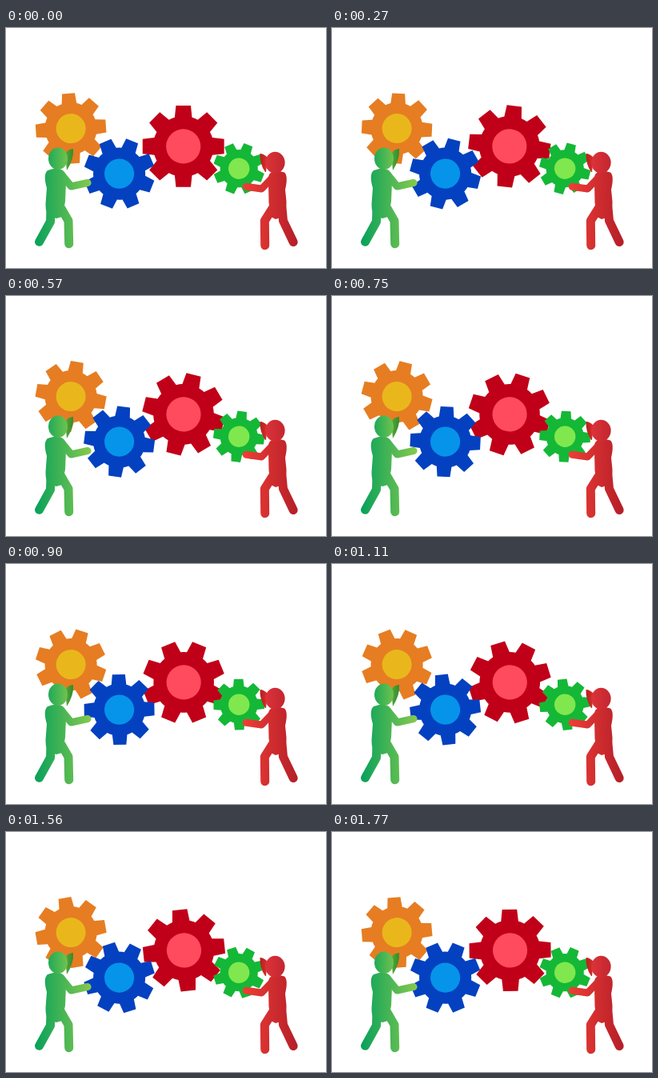
Write an HTML page with a canvas that moves like this. It is 400 by 300 pixels and loops after 1.8 s.

```html
<!DOCTYPE html>
<html lang="en">
<head>
<meta charset="utf-8">
<title>Gears</title>
<style>
html, body { margin: 0; width: 100%; height: 100%; overflow: hidden; background: #fff; }
canvas { display: block; width: 400px; height: 300px; }
</style>
</head>
<body>
<canvas id="stage" width="400" height="300"></canvas>
<script>
const ctx = document.getElementById('stage').getContext('2d');
const LOOP = 1800, STEP = 30, TEETH = 8;
const PITCH = Math.PI * 2 / TEETH;

// start: tooth angle in degrees from straight up; dir: 1 is clockwise
const gears = [
  { x: 81.1, y: 125.6, r: 44.6, hub: 18.5, start: -4, dir: 1, rim: '#e67d22', core: '#e9b71c' },
  { x: 221.7, y: 147.9, r: 51.8, hub: 21.6, start: 0, dir: 1, rim: '#c00018', core: '#ff4b5d', drift: 0.9 },
  { x: 141.6, y: 182.1, r: 44.6, hub: 18.6, start: 21.5, dir: -1, rim: '#0341c0', core: '#0594e9' },
  { x: 291.2, y: 175.7, r: 32.3, hub: 13.2, start: 21.5, dir: -1, rim: '#14b836', core: '#80e84e' }
];

function disc(x, y, rx, ry, fill) {
  ctx.fillStyle = fill;
  ctx.beginPath();
  ctx.ellipse(x, y, rx, ry, 0, 0, Math.PI * 2);
  ctx.fill();
}

function drawGear(g, p) {
  const tip = 0.18, root = 0.29, body = g.r * 0.73;
  ctx.save();
  ctx.translate(g.x + (g.drift || 0) * p, g.y);
  ctx.rotate(g.start * Math.PI / 180 + g.dir * p * PITCH - Math.PI / 2);
  ctx.fillStyle = g.rim;
  ctx.beginPath();
  for (let i = 0; i < TEETH; i++) {
    const a = i * PITCH;
    for (const s of [-1, 1]) {
      ctx.lineTo(g.r * Math.cos(a + s * tip), g.r * Math.sin(a + s * tip));
    }
    ctx.arc(0, 0, body, a + root, a + PITCH - root);
  }
  ctx.closePath();
  ctx.fill();
  disc(0, 0, g.hub, g.hub, g.core);
  ctx.restore();
}

function fade(x0, x1, c0, c1) {
  const f = ctx.createLinearGradient(x0, 0, x1, 0);
  f.addColorStop(0, c0);
  f.addColorStop(1, c1);
  return f;
}

function limb(points, width, paint) {
  ctx.strokeStyle = paint;
  ctx.lineWidth = width;
  ctx.lineCap = ctx.lineJoin = 'round';
  ctx.beginPath();
  for (const point of points) ctx.lineTo(...point);
  ctx.stroke();
}

function shape(d, paint) {
  ctx.fillStyle = paint;
  ctx.fill(new Path2D(d));
}

function drawLeftPerson() {
  const skin = fade(38, 106, '#0aa25a', '#86c94e');
  shape('M76 178 L74 157 Q78 151 84 151 Q85 164 76 178 Z', fade(74, 85, '#57a83a', '#2c8a2a'));
  limb([[56, 224], [55.5, 242], [41.5, 267.3]], 11, skin);
  limb([[67, 222], [78, 241], [78.7, 269.8]], 11, skin);
  shape('M59 176 Q69 175 73 180 Q76 184 75 193 L74 217 L70 236 L63 238 L56 236 ' +
    'Q49 232 49.5 220 L51 200 Q46 183 52 178 Z', skin);
  limb([[70, 184], [81.5, 198], [102, 193.6]], 9.2, skin);
  disc(65, 163.2, 12, 13.7, fade(53, 77, '#20a957', '#70c34f'));
}

function drawRightPerson() {
  const skin = fade(297, 365, '#ee3d36', '#b41e28');
  shape('M325 180 L327 162 Q322 157 317.5 157 Q317 170 324 180 Z', fade(317, 327, '#b51c1e', '#d8322c'));
  limb([[345, 225], [346.5, 241], [359.2, 267.6]], 11, skin);
  limb([[334, 224], [323.3, 241], [323.7, 271.7]], 11, skin);
  shape('M342 179 Q333 178 329 183 Q327 188 328 195 L328.5 218 L331 236 L337 239 L346 236 ' +
    'Q351 230 350.5 217 L349 202 Q353 185 348 180.5 Z', skin);
  limb([[333, 187], [319.5, 201], [300.2, 198.3]], 9, skin);
  disc(336.4, 168.2, 12.2, 13.5, fade(324, 349, '#dc333a', '#c2262f'));
}

function draw(now) {
  const p = Math.floor((now % LOOP) / STEP) * STEP / LOOP;
  ctx.fillStyle = '#fff';
  ctx.fillRect(0, 0, 400, 300);
  for (const g of gears) drawGear(g, p);
  drawLeftPerson();
  drawRightPerson();
}

const begin = performance.now();
function tick() {
  draw(performance.now() - begin);
  requestAnimationFrame(tick);
}
tick();
</script>
</body>
</html>
```
